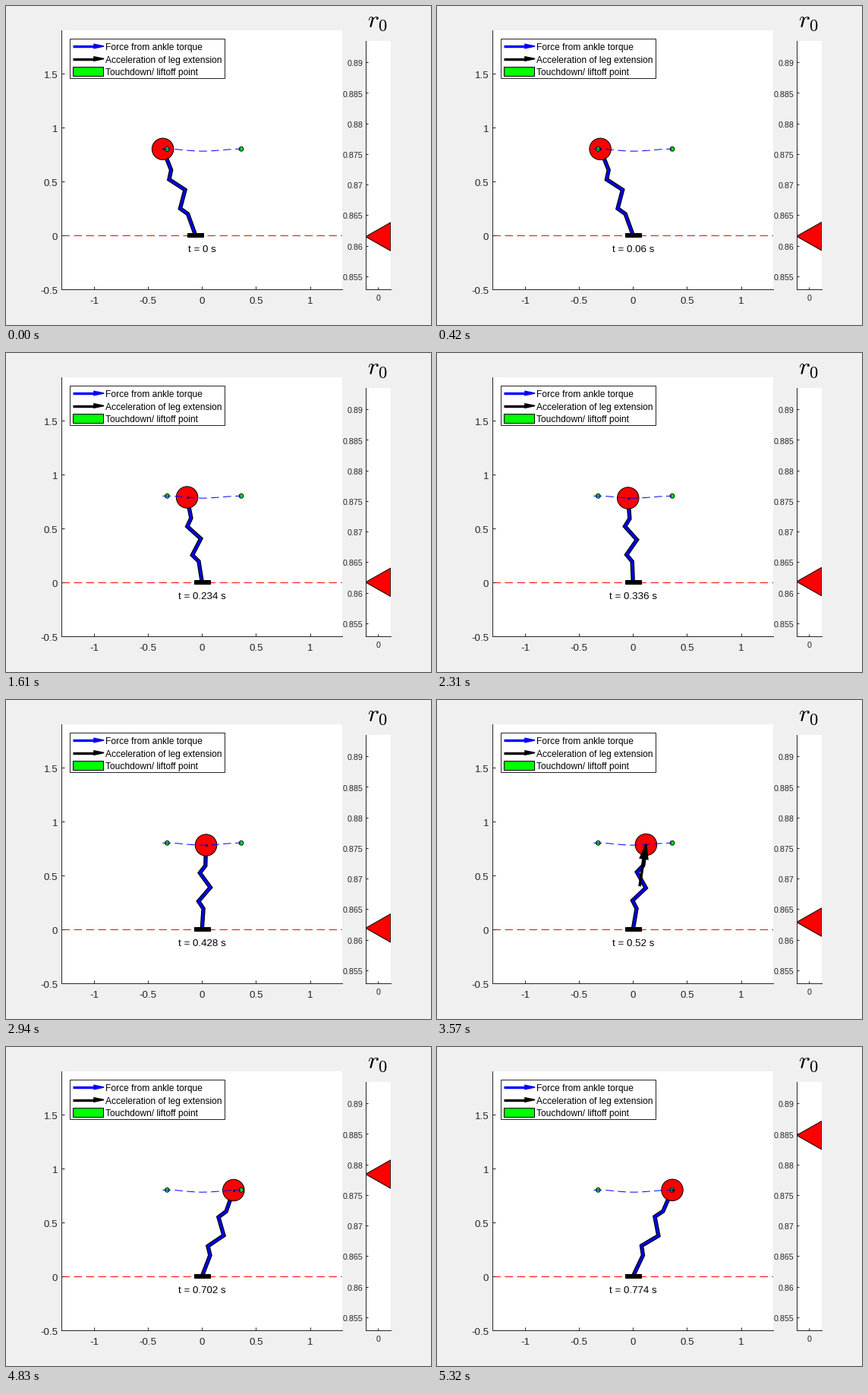
Write a matplotlib script that moves like this. It is 560x420 px and loops after 5390 ms.

```python
import numpy as np
import matplotlib.pyplot as plt
from matplotlib.animation import FuncAnimation
from matplotlib.patches import Circle, Polygon, Rectangle
from matplotlib.transforms import ScaledTranslation

W, H, DPI = 560, 420, 96
FRAMES, INTERVAL = 77, 70
PX = 72 / DPI  # one pixel in points
INK = "#262626"
UNIT = 370 / 2.6  # pixels per metre in the main view

plt.rcParams.update({
    "font.family": "Liberation Sans",
    "mathtext.fontset": "cm",
    "axes.unicode_minus": False,
})

fig = plt.figure(figsize=(W / DPI, H / DPI), dpi=DPI, facecolor="#f0f0f0")


def make_axes(box, xlim, ylim, xticks, yticks, size, tick, pads, drop):
    """Axes in pixel box (left, top, right, bottom); drop lowers the y labels."""
    left, top, right, bottom = box
    ax = fig.add_axes([left / W, 1 - bottom / H, (right - left) / W, (bottom - top) / H])
    ax.set(xlim=xlim, ylim=ylim, xticks=xticks, yticks=yticks, facecolor="white")
    for edge in ("top", "right"):
        ax.spines[edge].set_visible(False)
    for edge in ("left", "bottom"):
        ax.spines[edge].set(linewidth=PX, color=INK)
    ax.tick_params(direction="in", length=tick * PX, width=PX, color=INK,
                   labelcolor=INK, labelsize=size)
    shift = ScaledTranslation(0, -drop / DPI, fig.dpi_scale_trans)
    for axis, pad in zip((ax.xaxis, ax.yaxis), pads):
        axis.set_tick_params(pad=pad * PX)
        axis.set_major_formatter("{x:g}")
    for label in ax.get_yticklabels():
        label.set_transform(label.get_transform() + shift)
    return ax


main = make_axes((73.3, 31.8, 443.3, 373.2), (-1.3, 1.3), (-0.5, 1.9),
                 [-1, -0.5, 0, 0.5, 1], [-0.5, 0, 0.5, 1, 1.5],
                 10, 3.7, (10.2, 5), 1.6)

R_SCALE = 8043  # pixels per unit of rest length
side = make_axes((473.8, 46.3, 506.8, 373.2), (-0.5, 0.5),
                 (0.89 - 299 / R_SCALE, 0.89 + 28 / R_SCALE),
                 [0], np.arange(0.855, 0.891, 0.005), 8, 3.3, (7, 3.5), 1.1)

overlay = fig.add_axes([0, 0, 1, 1], zorder=5)
overlay.set(xlim=(0, W), ylim=(H, 0))
overlay.axis("off")


# Motion
k = np.arange(FRAMES)
time = np.floor(k * 5.1 + 1e-6) * 0.002
speed = np.interp(k, [0, 47, 51, 56, 66, 72, 76],
                  [0.08, 0.08, 3.6, 6.6, 8.4, 7.7, 6.1])
travel = np.concatenate([[0], np.cumsum((speed[1:] + speed[:-1]) / 2)])
rest_length = 0.86147 + travel / R_SCALE

TOUCH, LIFT, START = -0.323, 0.363, -0.365
PUSH_ON, PUSH_OFF = 47, 57


def ball_x(t):
    tau = t - 0.387
    return 0.9 * tau + 0.26 * tau ** 3


def ball_y(x):
    reach = np.where(x < 0, -TOUCH, LIFT)
    return 0.79 - 0.01 * np.cos(np.pi * np.clip(x / reach, -1, 1))


def push(i):
    if not PUSH_ON < i < PUSH_OFF:
        return 0
    return 0.41 * np.sin(np.pi * (i - PUSH_ON) / (PUSH_OFF - PUSH_ON))


ALONG = np.array([0, 0.245, 0.33, 0.5, 0.667, 0.755, 1])
ACROSS = np.array([0, 0.5, -6.4, 8.4, -6.4, 0.5, 0]) / UNIT


def leg_points(foot, ball):
    axis = ball - foot
    u = axis / np.hypot(*axis)
    n = np.array([u[1], -u[0]])
    return foot + ALONG[:, None] * axis + ACROSS[:, None] * n


def arrow_parts(tail, tip, length, half):
    d = tip - tail
    u = d / np.hypot(*d)
    n = np.array([-u[1], u[0]])
    base = tip - length * u
    return base, [tip, base + half * n, base - half * n]


# Main view
dashed = dict(lw=PX, ls=(0, (10.5, 5.5)))
main.plot([-1.3, 1.3], [0, 0], color="red", zorder=1, **dashed)
leg_style = dict(solid_joinstyle="miter", solid_capstyle="butt")
leg_edge, = main.plot([], [], color="black", lw=5.4 * PX, zorder=2, **leg_style)
leg_core, = main.plot([], [], color="blue", lw=3 * PX, zorder=2.1, **leg_style)
shoe = main.add_patch(Rectangle((0, -0.015), 0.15, 0.036, fc="black", ec="black",
                                lw=PX, zorder=3))
ball = main.add_patch(Circle((0, 0), 0.1, fc="red", ec="black", lw=PX, zorder=4))
for x in (TOUCH, LIFT):
    main.add_patch(Circle((x, 0.8), 0.02, fc="lime", ec="black", lw=PX, zorder=5))
path_x = np.linspace(START, LIFT, 120)
main.plot(path_x, ball_y(path_x), color="blue", zorder=5.5, **dashed)
hub, = main.plot([], [], "o", color="#000080", ms=3.2 * PX, mew=0, zorder=6)
shaft, = main.plot([], [], color="black", lw=3.6 * PX, zorder=7, solid_capstyle="butt")
head = main.add_patch(Polygon(np.zeros((3, 2)), fc="black", ec="black",
                              lw=2.5 * PX, zorder=7))
clock = main.text(0, -0.154, "", size=10, ha="center", va="baseline")

# Side gauge
pointer = side.add_patch(Polygon(np.zeros((3, 2)), fc="red", ec="black", lw=PX, zorder=2))
overlay.text(489.5, 28, "$r_0$", size=24, ha="center", va="baseline")

# Legend
overlay.add_patch(Rectangle((83.5, 42.5), 204, 52, fc="white", ec=INK, lw=PX))
for y, color in ((53, "blue"), (69.5, "black")):
    base, tri = arrow_parts(np.array([88, y]), np.array([129, y]), 13, 2.6)
    overlay.plot([88, base[0] + 1], [y, y], color=color, lw=3.4 * PX,
                 solid_capstyle="butt")
    overlay.add_patch(Polygon(tri, fc=color, ec=color, lw=1.6 * PX))
overlay.add_patch(Rectangle((87.5, 79.5), 40, 12, fc="lime", ec="black", lw=PX))
for y, label in ((58, "Force from ankle torque"),
                 (74.5, "Acceleration of leg extension"),
                 (91, "Touchdown/ liftoff point")):
    overlay.text(131, y, label, size=9, va="baseline")


def draw(i):
    t = time[i]
    x = ball_x(t)
    centre = np.array([x, ball_y(x)])
    foot = np.array([min(0, 1.5 * (x - TOUCH)), 0.002])

    pts = leg_points(foot, centre)
    leg_edge.set_data(*pts.T)
    leg_core.set_data(*pts.T)
    shoe.set_x(foot[0] - 0.075)
    ball.center = centre
    hub.set_data([x], [centre[1]])

    size = push(i)
    for part in (shaft, head):
        part.set_visible(size > 0)
    if size > 0:
        u = (centre - foot) / np.hypot(*(centre - foot))
        tail = centre - size * u
        base, tri = arrow_parts(tail, centre, 0.33 * size, 0.085 * size)
        shaft.set_data(*np.array([tail, base + 0.01 * u]).T)
        head.set_xy(tri)

    r = rest_length[i]
    half = 18.7 / R_SCALE
    pointer.set_xy([(-0.5, r), (0.5, r + half), (0.5, r - half)])
    clock.set_text(f"t = {t:.4g} s")
    return leg_edge, leg_core, shoe, ball, hub, shaft, head, pointer, clock


anim = FuncAnimation(fig, draw, frames=FRAMES, interval=INTERVAL, repeat=True)
plt.show()
```
